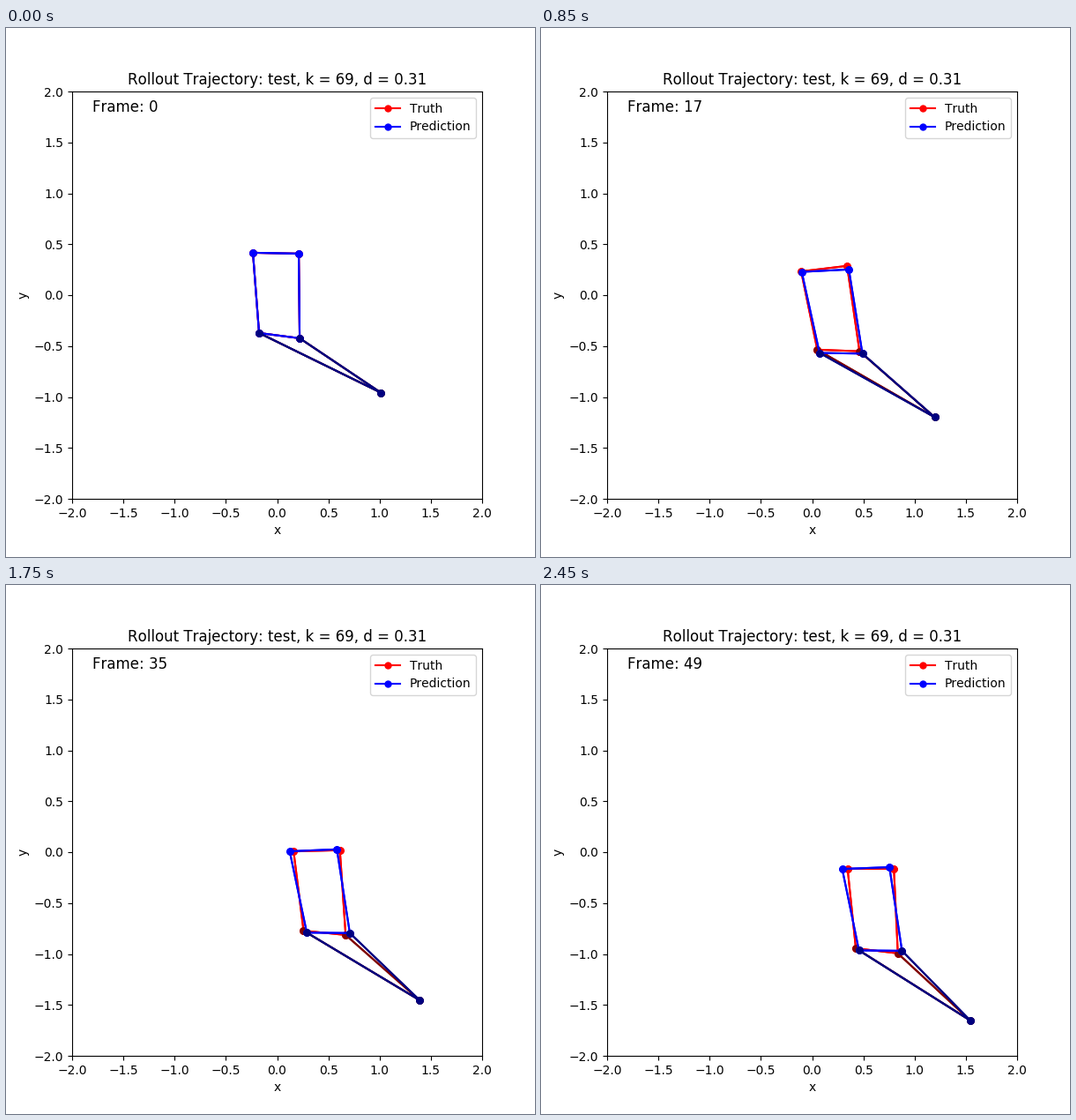
Recreate the animation shown at these times as a matplotlib script. Size 600x600 px, loop 2.5 s.

```python
import numpy as np
import matplotlib.pyplot as plt
from matplotlib.animation import FuncAnimation

FRAMES, INTERVAL = 50, 50
plt.rcParams["text.kerning_factor"] = 6

n = np.arange(FRAMES)
drift = n / (FRAMES - 1)                       # steady turn
swing = (n / 11 * np.exp(1 - n / 11)) ** 1.3   # one damped swing
settle = 1 - np.exp(-n / 6)                    # quick move to rest


def bar(length, angle, stretch=0, turn=0, sway=0, rest=0):
    """Path of a bar's vector, as complex stage pixels with y down."""
    degrees = angle + turn * drift + sway * swing + rest * settle
    return (length + stretch * settle) * np.exp(1j * np.radians(degrees))


def linkage(arm, base, side, top):
    """Corner paths, from the arm's tip back through the bars."""
    low_left = TIP - arm
    top_left = low_left + side
    corners = [top_left, top_left + top, low_left + base, low_left, TIP]
    return [((p.real - 307.5) / 116.25, (303 - p.imag) / 115.5) for p in corners]


# The free tip moves in a straight line.
TIP = 425 + 413.5j + n * (1.265 + 1.643j)

# Both bodies start from the same pose: (length, angle) of each bar.
ARM, BASE, SIDE, TOP = (153.6, 26.1), (46.4, 7.4), (91.3, -94.4), (52, 1.1)

truth = linkage(
    arm=bar(*ARM, turn=6, sway=2),
    base=bar(*BASE, stretch=1.6, sway=-6),
    side=bar(*SIDE, stretch=-0.7, turn=-0.9, sway=-8),
    top=bar(*TOP, stretch=0.5, turn=-0.4, sway=-9),
)
prediction = linkage(
    arm=bar(*ARM, stretch=-4.3, turn=4.5, rest=1.6),
    base=bar(*BASE, stretch=2.4, rest=-6.9),
    side=bar(*SIDE, stretch=3, sway=-1.5, rest=-7.1),
    top=bar(*TOP, stretch=1.6, sway=-1.2, rest=-3.2),
)

fig, ax = plt.subplots(figsize=(6, 6), dpi=100)
ax.set_xlim(-2, 2)
ax.set_ylim(-2, 2)
ax.set_xlabel("x")
ax.set_ylabel("y")
ax.set_title("Rollout Trajectory: test, k = 69, d = 0.31")
counter = ax.text(-1.8, 1.8, "", fontsize=12)

# Corner pairs joined by an edge; the arm's edges are darker.
BOX_EDGES = [(0, 1), (1, 2), (2, 3), (3, 0)]
ARM_EDGES = [(3, 4), (2, 4)]


def add_line(color, label=None):
    line, = ax.plot([], [], "o-", color=color, markersize=5, label=label)
    return line


edges = []
for path, color, label in [(truth, (1, 0, 0), "Truth"),
                           (prediction, (0, 0, 1), "Prediction")]:
    add_line(color, label)
    dark = tuple(c / 2 for c in color)
    for pairs, shade in [(BOX_EDGES, color), (ARM_EDGES, dark)]:
        # Every edge is laid down in both directions.
        for a, b in pairs + [pair[::-1] for pair in pairs]:
            edges.append((add_line(shade), path[a], path[b]))

ax.legend(loc="upper right")


def draw(frame):
    counter.set_text(f"Frame: {frame}")
    for line, (xa, ya), (xb, yb) in edges:
        line.set_data([xa[frame], xb[frame]], [ya[frame], yb[frame]])
    return [counter] + [edge[0] for edge in edges]


anim = FuncAnimation(fig, draw, frames=FRAMES, interval=INTERVAL, repeat=True)
plt.show()
```
